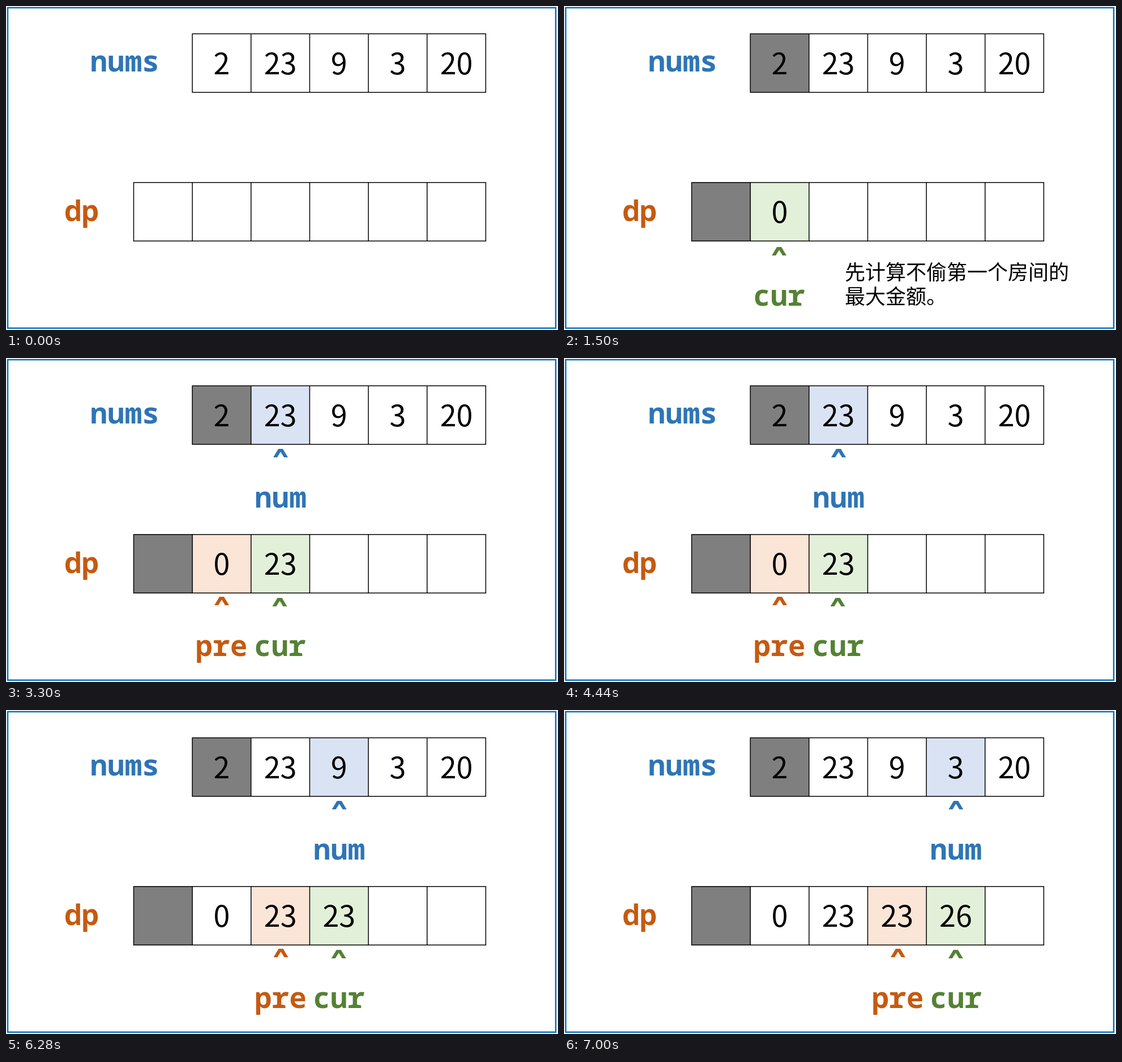
These frames come from a looping animation (975x574 px, 8000 ms). An HTML page with a canvas:

```html
<!DOCTYPE html>
<html lang="zh">
<head>
<meta charset="utf-8">
<title>dp</title>
<style>
  html, body { margin: 0; width: 100%; height: 100%; overflow: hidden; background: #fff; }
  canvas { display: block; width: 975px; height: 574px; }
</style>
</head>
<body>
<canvas id="stage"></canvas>
<script>
const W = 975, H = 574, LOOP = 8000;
const CELL = 103.65, NUMS_X = 329.1, DP_X = 225.5, NUMS_Y = 49.3, DP_Y = 312.7;
const BLUE = '#2e75b6', ORANGE = '#c55a11', GREEN = '#548235', GRAY = '#7f7f7f';
const PALE_BLUE = '#dae3f3', PALE_ORANGE = '#fbe5d6', PALE_GREEN = '#e2f0d9';
const MONO = 'bold 51px "Noto Sans Mono", "DejaVu Sans Mono", monospace';
const DIGITS = '52px "Noto Sans CJK SC", "Noto Sans", sans-serif';
const NOTE = '36px "Noto Sans CJK SC", "Noto Sans CJK", sans-serif';

const nums = [2, 23, 9, 3, 20];
const dp = [0, 23, 23, 26];
const starts = [0, 1500, 3300, 5200, 7000];

const canvas = document.getElementById('stage');
const ctx = canvas.getContext('2d');
const scale = window.devicePixelRatio || 1;
canvas.width = W * scale;
canvas.height = H * scale;

function text(str, x, y, font, color, align = 'left') {
  ctx.font = font;
  ctx.fillStyle = color;
  ctx.textAlign = align;
  ctx.fillText(str, x, y);
}

function row(x, y, count, values, fills) {
  for (let i = 0; i < count; i++) {
    const left = x + i * CELL;
    ctx.fillStyle = fills[i] || '#fff';
    ctx.fillRect(left, y, CELL, CELL);
    if (values[i] !== undefined) text(values[i], left + CELL / 2, y + 71.7, DIGITS, '#000', 'center');
  }
  ctx.strokeStyle = '#000';
  ctx.lineWidth = 1.5;
  ctx.strokeRect(x, y, count * CELL, CELL);
  ctx.beginPath();
  for (let i = 1; i < count; i++) {
    ctx.moveTo(x + i * CELL, y);
    ctx.lineTo(x + i * CELL, y + CELL);
  }
  ctx.stroke();
}

function caret(x, y, color) {
  ctx.fillStyle = color;
  ctx.beginPath();
  for (const [dx, dy] of [[-13, 15], [-4, 0], [4, 0], [13, 15], [6, 15], [0, 5.2], [-6, 15]]) {
    ctx.lineTo(x + dx, y + dy);
  }
  ctx.fill();
}

// Mono label whose letter r carries slab serifs
function label(str, x, y, color) {
  text(str, x, y, MONO, color);
  const at = str.indexOf('r');
  if (at < 0) return;
  const left = x + ctx.measureText(str.slice(0, at)).width;
  ctx.fillRect(left + 2, y - 5, 19, 5);
  ctx.fillRect(left + 2, y - 27.5, 10, 5);
}

function draw(step) {
  ctx.setTransform(scale, 0, 0, scale, 0, 0);
  ctx.fillStyle = '#fff';
  ctx.fillRect(0, 0, W, H);
  ctx.strokeStyle = '#0070c0';
  ctx.lineWidth = 2.5;
  ctx.strokeRect(3, 3, 968, 567.7);

  label('nums', 148.5, 116, BLUE);
  label('dp', 103, 381, ORANGE);

  const numFills = [], dpFills = [];
  if (step > 0) {
    numFills[0] = dpFills[0] = GRAY;
    dpFills[step] = PALE_GREEN;
  }
  if (step > 1) {
    numFills[step - 1] = PALE_BLUE;
    dpFills[step - 1] = PALE_ORANGE;
  }
  row(NUMS_X, NUMS_Y, 5, nums, numFills);
  row(DP_X, DP_Y, 6, [undefined, ...dp.slice(0, step)], dpFills);

  if (step === 1) {
    caret(380, 427, GREEN);
    label('cur', 334, 531, GREEN);
    text('先计算不偷第一个房间的', 496, 485, NOTE, '#000');
    text('最大金额。', 496, 527.5, NOTE, '#000');
  } else if (step > 1) {
    const shift = (step - 2) * CELL;
    caret(485 + shift, 161, BLUE);
    label('num', 439 + shift, 265, BLUE);
    caret(381 + shift * 1.008, 423, ORANGE);
    label('pre', 334.5 + shift * 1.008, 527.5, ORANGE);
    caret(483.5 + shift * 1.005, 425, GREEN);
    label('cur', 438 + shift * 1.005, 528, GREEN);
  }
}

const origin = performance.now();
function tick() {
  const t = (performance.now() - origin) % LOOP;
  draw(starts.filter(s => s <= t).length - 1);
  requestAnimationFrame(tick);
}
tick();
</script>
</body>
</html>
```
